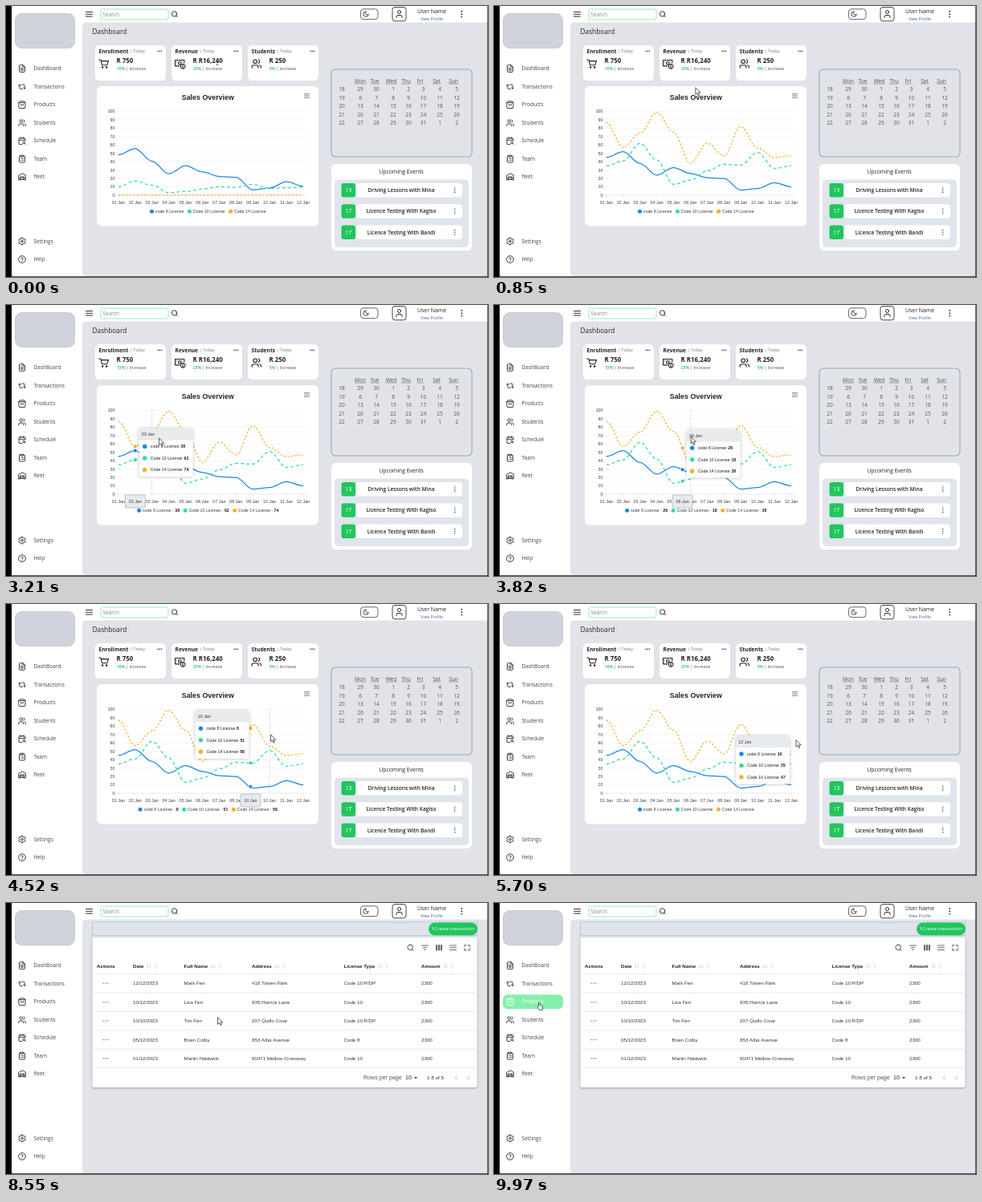
Animation, 600 px wide and 338 px high, one loop 10 s. Source, as an HTML page with a canvas:

```html
<!DOCTYPE html>
<html lang="en">
<head>
<meta charset="utf-8">
<title>Dashboard</title>
<style>
html, body { margin: 0; width: 100%; height: 100%; overflow: hidden; background: #fff; }
canvas { display: block; width: 600px; height: 338px; }
</style>
</head>
<body>
<canvas id="stage"></canvas>
<script>
const LOOP = 10000, PAGE_SWITCH = 7620;
const canvas = document.getElementById('stage');
const c = canvas.getContext('2d');
const dpr = window.devicePixelRatio || 1;
canvas.width = 600 * dpr;
canvas.height = 338 * dpr;

const UI = '"Open Sans", "Noto Sans", sans-serif';
const ARIAL = '"Liberation Sans", Arial, sans-serif';
const INK = '#222', GREEN = '#22c55e', MINT = '#86efac', BACK = '#e1e3e8';

const circle = (x, y, r) => `M${x + r} ${y}a${r} ${r} 0 1 1-${2 * r} 0a${r} ${r} 0 1 1 ${2 * r} 0`;
const ICONS = {
  file: 'M14 2H6a2 2 0 0 0-2 2v16a2 2 0 0 0 2 2h12a2 2 0 0 0 2-2V8zM14 2v6h6M16 13H8M16 17H8M10 9H8',
  repeat: 'M2 9l3-3 3 3M13 18H7a2 2 0 0 1-2-2V6M22 15l-3 3-3-3M11 6h6a2 2 0 0 1 2 2v10',
  bag: 'M3 6h18v14a2 2 0 0 1-2 2H5a2 2 0 0 1-2-2zM3 6l3-4h12l3 4M16 10a4 4 0 0 1-8 0',
  users: 'M16 21v-2a4 4 0 0 0-4-4H6a4 4 0 0 0-4 4v2M22 21v-2a4 4 0 0 0-3-3.9M16 3.1a4 4 0 0 1 0 7.8' + circle(9, 7, 4),
  calendar: 'M21 11V6a2 2 0 0 0-2-2H5a2 2 0 0 0-2 2v14a2 2 0 0 0 2 2h7M16 2v4M8 2v4M3 10h18M22 22l-2.5-2.5' + circle(17, 17, 3),
  clipboard: 'M8 2h8v4H8zM16 4h2a2 2 0 0 1 2 2v14a2 2 0 0 1-2 2H6a2 2 0 0 1-2-2V6a2 2 0 0 1 2-2h2M12 11h4M12 16h4M8 11h.1M8 16h.1',
  warehouse: 'M22 8.4V21h-4V12H6v9H2V8.4L12 3zM6 16h12M6 20h12',
  gear: 'M10 2h4l.6 3 2.4 1.4 2.9-1 2 3.4-2.3 2v2.4l2.3 2-2 3.4-2.9-1L14.6 19 14 22h-4l-.6-3L7 17.6l-2.9 1-2-3.4 2.3-2v-2.4l-2.3-2 2-3.4 2.9 1L9.4 5z' + circle(12, 12, 3),
  help: 'M9 9a3 3 0 0 1 5.8 1c0 2-2.8 2.5-2.8 4M12 17.5h.1' + circle(12, 12, 10),
  cart: 'M1 3h4l3 12h11l3-9H6' + circle(9, 20, 1.2) + circle(18, 20, 1.2),
  money: 'M21 10V4H1v13h9M4 8h.1M17 8h.1M18 15v6' + circle(11, 10.5, 3) + circle(18, 18, 5),
  user: 'M19 21v-2a4 4 0 0 0-4-4H9a4 4 0 0 0-4 4v2' + circle(12, 7, 4),
  search: 'M21 21l-4.3-4.3' + circle(11, 11, 8),
  moon: 'M12 3a6 6 0 0 0 9 9a9 9 0 1 1-9-9',
  filter: 'M3 6h18M7 12h10M10 18h4',
  columns: 'M5 5v14M12 5v14M19 5v14',
  lines: 'M2 5h20M2 12h20M2 19h20',
  expand: 'M4 9V4h5M15 4h5v5M20 15v5h-5M9 20H4v-5',
  left: 'M15 5l-7 7 7 7',
  right: 'M9 5l7 7-7 7',
  sort: 'M7 20V4l-4 4M17 4v16l4-4'
};
const shapes = Object.fromEntries(Object.entries(ICONS).map(([k, d]) => [k, new Path2D(d)]));
const ARROW = new Path2D('M0 0V8.6L2 6.8 3.4 10 4.8 9.4 3.4 6.3H6.2Z');
const HAND = new Path2D('M1.5 5V.8a.8 .8 0 0 1 1.6 0V3.6l2.6 .6q1.2 .3 1 1.6L6.2 9.4H2.6L.2 6.4Q0 5.4 1.5 5Z');

function icon(name, x, y, size, color = INK, weight = 2) {
  c.save();
  c.translate(x - size / 2, y - size / 2);
  c.scale(size / 24, size / 24);
  c.strokeStyle = color;
  c.lineWidth = weight;
  c.lineCap = c.lineJoin = 'round';
  c.stroke(shapes[name]);
  c.restore();
}
function text(s, x, y, size, { color = INK, weight = 400, font = UI, align = 'left' } = {}) {
  c.font = `${weight} ${size}px ${font}`;
  c.fillStyle = color;
  c.textAlign = align;
  c.fillText(s, x, y + size * 0.35);
  return c.measureText(s).width;
}
function box(x, y, w, h, r, fill, stroke, lw = 1) {
  c.beginPath();
  c.roundRect(x, y, w, h, r);
  if (fill) { c.fillStyle = fill; c.fill(); }
  if (stroke) { c.strokeStyle = stroke; c.lineWidth = lw; c.stroke(); }
}
function line(x1, y1, x2, y2, color, lw = 0.6, dash = []) {
  c.beginPath();
  c.moveTo(x1, y1);
  c.lineTo(x2, y2);
  c.strokeStyle = color;
  c.lineWidth = lw;
  c.setLineDash(dash);
  c.stroke();
  c.setLineDash([]);
}
function dot(x, y, r, color) {
  c.beginPath();
  c.arc(x, y, r, 0, 7);
  c.fillStyle = color;
  c.fill();
}
function dots(x, y, gap, r, color, vertical) {
  for (const k of [-1, 0, 1]) dot(x + (vertical ? 0 : k * gap), y + (vertical ? k * gap : 0), r, color);
}

// Pointer: time, x, y of the tip
const PATH = [
  [0, 263, 70], [250, 262, 74], [900, 250, 104], [1500, 214, 164], [1760, 197, 169], [1940, 194.5, 169.5],
  [2150, 188, 171], [2500, 146, 172], [2700, 143, 172], [3000, 158, 168], [3165, 167, 166], [3210, 190.5, 166],
  [3500, 215, 165], [4000, 262, 164], [4440, 305, 163], [4520, 329.5, 163], [4900, 338, 167],
  [5380, 361, 170], [5640, 368, 170], [5700, 376, 169.5], [6150, 380, 168], [6400, 350, 122],
  [6750, 210, 112], [7100, 78, 106], [7390, 61, 103], [8280, 62, 102], [8600, 300, 150],
  [9000, 540, 34], [9280, 548, 33], [9500, 400, 62], [9760, 80, 120], [9970, 54, 124], [10000, 54, 124]
];
function pointer(t) {
  const i = Math.max(1, PATH.findIndex(p => p[0] >= t));
  const [t0, x0, y0] = PATH[i - 1], [t1, x1, y1] = PATH[i];
  const k = (Math.max(t, 0) - t0) / (t1 - t0);
  return { x: x0 + (x1 - x0) * k, y: y0 + (y1 - y0) * k };
}

// Sidebar
const MENU = [
  ['file', 'DashBoard', 78], ['repeat', 'Transactions', 100.7], ['bag', 'Products', 123.2],
  ['users', 'Students', 145.8], ['calendar', 'Schedule', 168.2], ['clipboard', 'Team', 190.6],
  ['warehouse', 'fleet', 213], ['gear', 'Settings', 293.5], ['help', 'Help', 316]
];
const overMenu = (p, y) => p.x > 11 && p.x < 86 && Math.abs(p.y - y) < 9.3;

function drawFrame(p) {
  c.fillStyle = '#fff';
  c.fillRect(0, 0, 600, 338);
  box(95, 20.5, 505, 316.5, [5, 0, 0, 5], BACK);
  c.fillStyle = '#000';
  c.fillRect(0, 0, 7, 338);
  c.fillRect(7, 337.3, 593, 0.7);
  c.fillRect(599.4, 0, 0.6, 338);
  box(11.5, 9.5, 74, 43, 8, '#d0d3da', '#c6cad3');
  for (const [name, label, y] of MENU) {
    const hot = overMenu(p, y);
    if (hot) box(11, y - 9, 75, 18, 6, MINT);
    icon(name, 20, y, 10.5, hot ? '#fff' : INK);
    text(label, 34.5, y, 6.55, { color: hot ? '#fff' : '#444' });
  }
  icon('lines', 103.5, 10.3, 9.5, INK, 2.4);
  box(118, 4, 84, 13, 2.5, '#fff', MINT, 0.9);
  text('Search', 120.5, 10.7, 6.5, { color: '#888' });
  icon('search', 210, 10.3, 9.5, INK, 2.3);
  box(441.5, 3.8, 21.5, 12.8, 3.5, '#fff', '#555', 0.9);
  icon('moon', 448, 10.2, 8.5, INK, 2.3);
  box(481, 1.5, 17, 17.3, 3, '#fff', '#333', 0.9);
  icon('user', 489.5, 10, 12);
  text('User Name', 530, 7, 6.9, { align: 'center' });
  text('View Profile', 530, 15.8, 5.1, { align: 'center', color: '#47669f' });
  dots(567.3, 10.2, 3.4, 0.95, '#333', true);
}

// Dashboard
const SERIES = [
  { name: 'code 8 License', color: '#1b87e5', dash: [], values: [45, 52, 38, 24, 33, 26, 21, 20, 6, 8, 15, 10] },
  { name: 'Code 10 License', color: '#33dd9d', dash: [4, 3], values: [35, 41, 62, 42, 13, 18, 29, 37, 36, 51, 32, 35] },
  { name: 'Code 14 License', color: '#f3b02f', dash: [2.4, 2.2], values: [87, 57, 74, 99, 75, 38, 62, 47, 82, 56, 45, 47] }
];
const GREEN_START = [10, 17, 12, 3, 4.5, 7.5, 10, 9.5, 13, 8, 9, 9.5];
const px = i => 139.8 + 20.93 * i;
const py = v => 236 - 1.045 * v;
const day = i => String(i + 1).padStart(2, '0') + ' Jan';
const ease = k => { k = Math.min(1, Math.max(0, k)); return k * k * (3 - 2 * k); };

function valueAt(s, i, t) {
  const v = SERIES[s].values[i];
  if (s === 0) return v * (1.07 - 0.07 * ease(t / 350));
  if (s === 1) return GREEN_START[i] + (v - GREEN_START[i]) * ease(t / 500);
  return v * ease(t / 700);
}
function hoverAt(t) {
  const { x, y } = pointer(t);
  if (x < 130 || x > 372 || y < 131 || y > 236) return -1;
  return Math.max(0, Math.min(11, Math.round((x - px(0)) / 20.93)));
}
const tipLeft = i => i < 6 ? px(i) + 5 : Math.min(303, px(i) - 69);
const tipTop = i => py(SERIES[2].values[i]) - 22;

function drawCurve(s, t) {
  c.beginPath();
  for (let i = 0; i < 12; i++) {
    const x = px(i), y = py(valueAt(s, i, t));
    if (i) c.bezierCurveTo(px(i - 1) + 7.3, py(valueAt(s, i - 1, t)), x - 7.3, y, x, y);
    else c.moveTo(x, y);
  }
  c.strokeStyle = SERIES[s].color;
  c.lineWidth = 1.25;
  c.setLineDash(SERIES[s].dash);
  c.stroke();
  c.setLineDash([]);
}
function drawLegend(hover) {
  const suffix = s => hover < 0 ? '' : ' - ';
  const number = s => hover < 0 ? '' : String(s.values[hover]);
  const widths = SERIES.map(s => {
    c.font = `400 5.3px ${ARIAL}`;
    const w = c.measureText(s.name + suffix(s)).width;
    c.font = `700 5.3px ${ARIAL}`;
    return 6.8 + w + c.measureText(number(s)).width;
  });
  let x = 251.3 - (widths[0] + widths[1] + widths[2] + 9) / 2;
  SERIES.forEach((s, k) => {
    dot(x + 2.5, 256.3, 2.5, s.color);
    const w = text(s.name + suffix(s), x + 6.8, 256.3, 5.3, { font: ARIAL, color: '#373d3f' });
    text(number(s), x + 6.8 + w, 256.3, 5.3, { font: ARIAL, weight: 700 });
    x += widths[k] + 4.5;
  });
}
function drawTooltip(i, x, y, alpha) {
  c.save();
  c.globalAlpha = alpha;
  c.shadowColor = 'rgba(0,0,0,.25)';
  c.shadowBlur = 4 * dpr;
  box(x, y, 67, 59.5, 2.5, 'rgba(255,255,255,.97)');
  c.shadowColor = 'transparent';
  box(x, y, 67, 13.5, [2.5, 2.5, 0, 0], '#e8ebee');
  line(x, y + 13.5, x + 67, y + 13.5, '#dde1e4', 0.5);
  text(day(i), x + 3.2, y + 7, 5.4, { font: ARIAL, color: '#333' });
  SERIES.forEach((s, k) => {
    const ry = y + 22 + 14.5 * k;
    dot(x + 7, ry, 2.7, s.color);
    const w = text(s.name + ' ', x + 14, ry, 5.3, { font: ARIAL });
    text(s.values[i], x + 14.5 + w, ry, 5.3, { font: ARIAL, weight: 700 });
  });
  c.restore();
}
function drawChart(t) {
  box(113, 100, 276, 174.5, 6, '#fff');
  text('Sales Overview', 251.3, 114, 8.9, { font: ARIAL, weight: 700, align: 'center' });
  for (const k of [0, 1, 2]) line(371, 109.7 + 2.3 * k, 378, 109.7 + 2.3 * k, '#777', 0.9);
  for (let v = 0; v <= 100; v += 10) {
    line(135, py(v), 374, py(v), v ? '#f0f0f0' : '#d8d8d8', 0.6);
    text(v, 135.5, py(v), 5.3, { font: ARIAL, align: 'right', color: '#373d3f' });
  }
  for (let i = 0; i < 12; i++) {
    line(px(i), 236, px(i), 239, '#d8d8d8', 0.5);
    text(day(i), px(i), 245.5, 5.4, { font: ARIAL, align: 'center', color: '#373d3f' });
  }
  const hover = hoverAt(t);
  if (hover >= 0) line(px(hover), 131.5, px(hover), 236, '#aaa', 0.6, [1.5, 1.5]);
  SERIES.forEach((s, k) => drawCurve(k, t));
  drawLegend(hover);

  // Markers and tooltip trail the pointer by a short moving average
  const past = [];
  for (let lag = 40; lag <= 180; lag += 10) past.push(hoverAt(t - lag));
  const seen = past.filter(i => i >= 0);
  if (!seen.length) return;
  const mean = f => seen.reduce((sum, i) => sum + f(i), 0) / seen.length;
  if (hover >= 0) {
    const x = mean(px);
    for (const s of SERIES) {
      const y = mean(i => py(s.values[i]));
      dot(x, y, 2.5, '#fff');
      dot(x, y, 2.1, s.color);
    }
    box(x - 12.5, 237, 25, 16, 1, '#e6e9ed', '#9aa9b3', 0.6);
    text(day(hover), x, 245.5, 5.4, { font: ARIAL, align: 'center', color: '#373d3f' });
  }
  drawTooltip(hover >= 0 ? hover : seen[0], mean(tipLeft), mean(tipTop), seen.length / past.length);
}
function drawCard(x, title, amount, percent, name) {
  box(x, 49, 88, 44, 5.5, '#fff');
  const w = text(title, x + 4.5, 56.3, 6.65, { weight: 700 });
  text('| Today', x + 6.2 + w, 56.3, 5.3, { color: '#777' });
  dots(x + 80.3, 56.3, 2.2, 0.75, '#222');
  icon(name, x + 10.8, 72, 13.5);
  text(amount, x + 26.5, 68.3, 7.9, { weight: 700 });
  const pw = text(percent, x + 26.7, 78.5, 5.1, { color: GREEN, weight: 600 });
  text('| Increase', x + 28 + pw, 78.5, 5.3, { color: '#555' });
}
function drawCalendar() {
  box(405, 79, 175, 109, 5, BACK, '#9aa7bf', 1.1);
  const opts = { color: '#555', align: 'center' };
  const heads = [441, 459, 479.5, 498, 515.5, 536, 557], cols = [441, 461, 482, 501, 519.5, 540, 561];
  'Mon Tue Wed Thu Fri Sat Sun'.split(' ').forEach((d, i) => {
    const w = text(d, heads[i], 93.5, 6.6, opts);
    line(heads[i] - w / 2, 97, heads[i] + w / 2, 97, '#555', 0.5);
  });
  for (let r = 0; r < 5; r++) {
    const y = 104 + 10.5 * r;
    text(18 + r, 418, y, 6.5, opts);
    cols.forEach((x, i) => {
      const n = r * 7 + i - 1;
      text(n < 1 ? n + 30 : n > 31 ? n - 31 : n, x, y, 6.5, opts);
    });
  }
}
function drawEvents() {
  box(405, 197, 175, 108, 6, '#fff');
  text('Upcoming Events', 492, 207, 6.9, { align: 'center' });
  box(409, 216.5, 167, 84.5, 5, '#e0e5ec');
  [['13', 'Driving Lessons with Mina'], ['17', 'Licence Testing With Kagiso'], ['17', 'Licence Testing With Bandi']].forEach(([d, label], i) => {
    const y = 229.7 + 26.3 * i;
    box(417.5, y - 8.7, 17.5, 17.4, 3, GREEN);
    text(d, 426.2, y, 7, { align: 'center', color: '#fff' });
    box(436, y - 8.7, 132, 17.4, 4, '#fff');
    text(label, 492, y, 6.6, { align: 'center', weight: 600 });
    dots(558.7, y, 2.7, 0.8, '#555', true);
  });
}
function drawDashboard(t) {
  text('Dashboard', 107.5, 31.7, 8.3, { weight: 500 });
  drawCard(111, 'Enrollment', 'R 750', '10%', 'cart');
  drawCard(206, 'Revenue', 'R R16,240', '25%', 'money');
  drawCard(301, 'Students', 'R 250', '5%', 'users');
  drawCalendar();
  drawEvents();
  drawChart(t);
}

// Transactions
const COLUMNS = [['Actions', 113], ['Date', 158], ['Full Name', 221.5], ['Address', 306], ['License Type', 420.5], ['Amount', 517]];
const ROWS = [
  ['12/12/2023', 'Mark Fen', '418 Tolven Park', 'Code 10 P/DP', '2300'],
  ['10/12/2023', 'Lisa Fen', '935 Harrick Lane', 'Code 10', '2300'],
  ['10/10/2023', 'Tim Fen', '207 Quillo Cove', 'Code 10 P/DP', '2300'],
  ['05/12/2023', 'Brian Colby', '853 Alba Avenue', 'Code 8', '2300'],
  ['01/12/2023', 'Martin Haldwick', '60471 Mellow Crossway', 'Code 10', '2300']
];
function drawTransactions() {
  box(107.5, 24, 479, 16.5, 0, null, '#9cc9de', 0.8);
  box(526, 24.5, 61, 15.8, 7.9, GREEN);
  line(530.5, 29.5, 532.3, 34, '#fff', 0.7);
  text('Create transaction', 533.3, 32.3, 5.8, { color: '#fff' });
  c.save();
  c.shadowColor = 'rgba(0,0,0,.3)';
  c.shadowBlur = 3 * dpr;
  c.shadowOffsetY = dpr;
  box(107.5, 43, 479, 187, 2, '#fff');
  c.restore();
  const grey = '#666';
  icon('search', 503.5, 55.7, 9.5, grey, 2.6);
  icon('filter', 521.5, 55.7, 10.5, grey, 2.4);
  icon('columns', 539, 55.7, 10, grey, 5);
  icon('lines', 556.5, 55.7, 9.5, grey, 2.4);
  icon('expand', 574, 55.7, 9.5, grey, 2.6);
  COLUMNS.forEach(([label, x], i) => {
    const w = text(label, x, 79, 6.2, { font: ARIAL, weight: 700 });
    if (!i) return;
    icon('sort', x + w + 6.5, 79, 6.5, '#bbb');
    dots(x + w + 15, 79, 2, 0.6, '#aaa', true);
  });
  ROWS.forEach((row, r) => {
    const y = 100.3 + 23.4 * r;
    line(107.5, y - 11.7, 586.5, y - 11.7, '#dcdcdc', 0.6);
    dots(124, y, 2.7, 0.8, '#888');
    row.forEach((s, i) => text(s, COLUMNS[i + 1][1], y, 6.2, { font: ARIAL, color: '#333' }));
  });
  line(107.5, 205.6, 586.5, 205.6, '#dcdcdc', 0.6);
  text('Rows per page', 445, 218, 7.1, { font: ARIAL, color: '#555' });
  text('10', 497, 218, 7, { font: ARIAL });
  c.beginPath();
  c.moveTo(507.7, 217);
  c.lineTo(512.3, 217);
  c.lineTo(510, 219.4);
  c.fillStyle = '#555';
  c.fill();
  text('1-5 of 5', 524, 218, 6.2, { font: ARIAL });
  icon('left', 560.5, 218, 8, '#aaa', 2.4);
  icon('right', 575.5, 218, 8, '#aaa', 2.4);
}

function drawPointer(p, t) {
  c.save();
  c.translate(p.x, p.y);
  if (t < 300) {
    line(0, -3.5, 0, 3.5, '#444', 0.7);
    line(-1.3, -3.5, 1.3, -3.5, '#444', 0.7);
    line(-1.3, 3.5, 1.3, 3.5, '#444', 0.7);
  } else {
    const overButton = t > PAGE_SWITCH && p.x > 526 && p.x < 587 && p.y > 24 && p.y < 41;
    const shape = overButton || MENU.some(m => overMenu(p, m[2])) ? HAND : ARROW;
    c.fillStyle = '#fff';
    c.strokeStyle = '#333';
    c.lineWidth = 0.8;
    c.lineJoin = 'round';
    c.fill(shape);
    c.stroke(shape);
  }
  c.restore();
}

const start = performance.now();
function render(now) {
  const t = Math.max(0, now - start) % LOOP;
  const p = pointer(t);
  c.setTransform(dpr, 0, 0, dpr, 0, 0);
  drawFrame(p);
  if (t < PAGE_SWITCH) drawDashboard(t);
  else drawTransactions();
  drawPointer(p, t);
  requestAnimationFrame(render);
}
render(start);
</script>
</body>
</html>
```
